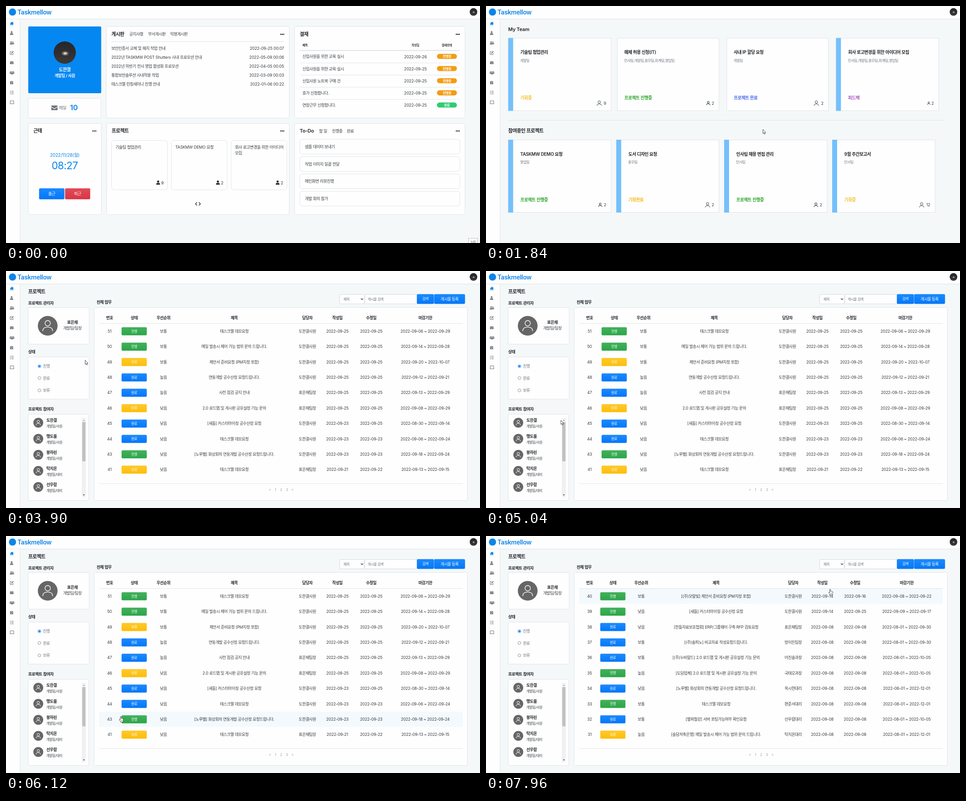
Recreate the animation shown at these times as an HTML page. Size 1057x530 px, loop 8 s.

```html
<!DOCTYPE html>
<html lang="ko">
<head>
<meta charset="utf-8">
<title>Groupware tour</title>
<style>
html, body { margin: 0; width: 100%; height: 100%; overflow: hidden; background: #f5f8f9; }
svg { display: block; width: 1057px; height: 530px; }
text { font-family: Inter, "Noto Sans CJK KR", "Noto Sans KR", sans-serif; letter-spacing: -.021em; white-space: pre; }
.k { letter-spacing: -.057em; }
.url { font-family: "Noto Sans", sans-serif; letter-spacing: 0; }
</style>
</head>
<body>
<svg id="stage" viewBox="0 0 1057 530" xmlns="http://www.w3.org/2000/svg"></svg>
<script>
const INK = '#363b40', GRAY = '#6c757d', BLUE = '#0d84e8', EDGE = '#dfe4e7';
const LOOP = 8000;

// drawing helpers
const text = (x, y, s, size = 9, fill = INK, weight = 400, anchor = 'start', extra = '') =>
  `<text x="${x}" y="${y}" font-size="${size}" fill="${fill}" font-weight="${weight}" text-anchor="${anchor}" ${extra}>` +
  String(s).replace(/&/g, '&amp;').replace(/</g, '&lt;').replace(/[가-힣]+/g, '<tspan class="k">$&</tspan>') + '</text>';
const mid = (x, y, s, size, fill, weight) => text(x, y, s, size, fill, weight, 'middle');
const bold = (x, y, s, size = 9, fill = '#212529') => text(x, y, s, size, fill, 600);
const rect = (x, y, x2, y2, fill, r = 0, extra = '') =>
  `<rect x="${x}" y="${y}" width="${x2 - x}" height="${y2 - y}" rx="${r}" fill="${fill}" ${extra}/>`;
const box = (x, y, x2, y2, r = 3, edge = EDGE) =>
  rect(x + .5, y + .5, x2 - .5, y2 - .5, '#fefefe', r, `stroke="${edge}"`);
const hline = (x, x2, y, c = EDGE, w = 1) => `<path d="M${x} ${y}H${x2}" stroke="${c}" stroke-width="${w}"/>`;
const disc = (x, y, r, fill, extra = '') => `<circle cx="${x}" cy="${y}" r="${r}" fill="${fill}" ${extra}/>`;
const path = (d, extra) => `<path d="${d}" ${extra}/>`;
const at = (x, y, s, body) => `<g transform="translate(${x} ${y}) scale(${s})">${body}</g>`;
const group = (id, body) => `<g id="${id}">${body}</g>`;
const dots = (x, y, id = '') =>
  `<g ${id && `id="${id}"`} fill="#212529">${[-3.2, 0, 3.2].map(d => `<circle cx="${x + d}" cy="${y}" r="1.35"/>`).join('')}</g>`;

const userSolid = (x, y, s = 1, c = GRAY) =>
  at(x, y, s, disc(0, -2, 2.1, c) + path('M-3.6 4V2.8Q-3.6 .6-1.4 .6H1.4Q3.6 .6 3.6 2.8V4Z', `fill="${c}"`));
const userLine = (x, y, s, c = INK, w = 1) =>
  at(x, y, s / 10, `<g fill="none" stroke="${c}" stroke-width="${w * 10 / s}">` +
    '<circle cy="-2.4" r="2.5"/><path d="M-4.5 5V4Q-4 1.2 0 1.2T4.5 4V5"/></g>');
const envelope = (x, y, s, c) => at(x, y, s,
  rect(-4, -3, 4, 3, c, .8) + path('M-4 -1.5L0 1.2L4 -1.5', 'fill="none" stroke="#fefefe" stroke-width=".7"'));
const photo = (x, y, r) => at(x, y, r / 25, '<g clip-path="url(#round)">' +
  disc(0, 0, 25, 'url(#sky)') + path('M-25 13Q-8 8 4 13T25 9V25H-25Z', 'fill="#3b3530"') +
  '<ellipse cx="1" cy="2" rx="10" ry="6.5" fill="url(#glow)"/></g>');

const SKIN = { blue: ['#1a8aff', '#0577f7'], red: ['#e04b59', '#d93545'], green: ['#43b05c', '#2ba648'], gold: ['#ffc92c', '#fdbe0a'] };
const gradient = ([id, [a, b]]) =>
  `<linearGradient id="${id}" x2="0" y2="1"><stop stop-color="${a}"/><stop offset="1" stop-color="${b}"/></linearGradient>`;
const button = (x, y, x2, y2, s, skin, size = 8, weight = 500) =>
  rect(x, y, x2, y2, `url(#${skin})`, 2, `stroke="${SKIN[skin][1]}" stroke-width=".5"`) +
  mid((x + x2) / 2, (y + y2) / 2 + size * .36, s, size, '#fff', weight);

const defs = `<defs>${Object.entries(SKIN).map(gradient).join('')}
  <linearGradient id="sky" x2="0" y2="1"><stop stop-color="#25262b"/><stop offset="1" stop-color="#38373a"/></linearGradient>
  <radialGradient id="glow"><stop stop-color="#fffbe8"/><stop offset=".22" stop-color="#d8d0bc"/><stop offset="1" stop-color="#555" stop-opacity="0"/></radialGradient>
  <clipPath id="round"><circle r="25"/></clipPath>
  <clipPath id="listClip"><rect x="51" y="328" width="118" height="178"/></clipPath></defs>`;

const sideIcons = () => {
  const line = `fill="none" stroke="${GRAY}" stroke-width="1"`;
  return path('M13 35.2L8.6 39.2H10V43H12.2V40.4H13.8V43H16V39.2H17.4L15.9 37.8V35.8H14.8V36.8Z', `fill="${BLUE}"`) +
    userSolid(12.5, 60.5) +
    userSolid(15.5, 82.5, .75) + userSolid(11.5, 82.5, .85) +
    path('M13.5 101.8H9.3V108.6H16V105.5', line) + path('M12 106.2L16.6 101.4', `stroke="${GRAY}" stroke-width="1.8"`) +
    envelope(12.8, 127, 1, GRAY) +
    userSolid(10, 148.6, .62) + userSolid(16.8, 148.6, .62) + userSolid(13.4, 149.5, .8) +
    rect(9, 168, 16, 175, GRAY, 1) + hline(9, 16, 169.8, '#fefefe', .6) + path('M10.8 172.4L12.2 173.6L14.4 171', 'fill="none" stroke="#fefefe"') +
    [190.5, 193.5, 196.5].map(y => hline(9, 10.4, y, GRAY, 1.3) + hline(11.6, 17, y, GRAY)).join('') +
    path('M9.6 218V212H17.2V218M8.4 218.7H18.4', line);
};

const frame = () =>
  rect(0, 0, 1057, 530, '#f5f8f9') + rect(0, 0, 31, 530, '#fefefe') + rect(31, 29, 32, 530, EDGE) +
  rect(0, 0, 1057, 29, '#fefefe') + rect(0, 28.5, 1057, 29.5, EDGE) +
  disc(14.5, 13.5, 8, BLUE) + text(25.5, 19, 'Taskmellow', 13.8, BLUE, 600) +
  photo(1042.5, 13.2, 8.6) + sideIcons();

function dashboard() {
  let s = rect(49.6, 45.7, 212.3, 195, '#0587f2', 2) + photo(131, 104, 25) +
    mid(131, 146, '도한결', 10, '#fff', 700) + mid(131, 159, '개발팀 / 사원', 8.8, '#fff', 700);
  s += box(49, 206, 212, 251) + envelope(108, 227.8, 1.75, GRAY) + text(118, 231, '메일', 9.6, GRAY, 500) +
    text(142.8, 233.4, '10', 16.4, BLUE, 600);

  s += box(49, 262, 213, 467) + bold(61, 283.2, '근태', 11) + dots(197, 279.5) +
    mid(131, 336.5, '2022/11/28(월)', 10, BLUE) + mid(131, 365, '08:27', 22.5, BLUE) +
    button(74, 408, 130, 432, '출근', 'blue', 9) + button(132, 408, 187.5, 432, '퇴근', 'red', 9);

  s += box(223, 45, 632, 251) + bold(235, 67, '게시판', 11) + text(275, 66.3, '공지사항') + text(317, 66.3, '부서게시판') +
    text(366, 66.3, '익명게시판') + dots(616, 63.3) + hline(235, 620, 79.5);
  ['보안인증서 교체 및 패치 작업 안내|09-25 00:07', '2022년 TASKMW POST Shutters 사내 프로모션 안내|05-09 00:06',
   '2022년 하반기 전사 영업 활성화 프로모션|04-05 00:05', '통합보안솔루션 사내적용 작업|03-09 00:03',
   '태스크멜 런칭세미나 진행 안내|01-06 00:22'].forEach((row, i) => {
    const [title, date] = row.split('|'), y = 98.2 + 20 * i;
    s += text(235, y, title) + text(620, y, '2022-' + date, 9, INK, 400, 'end');
  });

  s += box(643, 45, 1024, 251) + bold(655, 67, '결재', 11) + dots(1007.5, 63.3) + bold(661, 90, '제목', 6.6) +
    mid(913, 90, '작성일', 6.6, INK, 600) + mid(983, 90, '결재상태', 6.6, INK, 600) + hline(655, 1012, 99.5, '#d5dade', 1.3);
  ['신입사원을 위한 교육 실시', '신입사원을 위한 교육 실시', '신입사원 노트북 구매 건', '휴가 신청합니다.', '연장근무 신청합니다.'].forEach((title, i) => {
    const y = 113 + 27.2 * i, done = i == 4;
    s += text(661, y + 3.4, title) + mid(913, y + 3.6, `2022-09-${i ? 25 : 26}`, 9, INK, 400) +
      rect(961, y - 6, 1005.5, y + 5.3, done ? '#2ecc71' : '#f39c12', 5.6) + mid(983.2, y + 2.3, done ? '완료' : '진행중', 7.4, '#fff', 700);
    if (!done) s += hline(655, 1012, y + 14.2);
  });

  s += box(224, 262, 632, 467) + bold(235.5, 283.2, '프로젝트', 11) + dots(616, 279.5, 'more');
  [['기술팀 협업관리', '', 9], ['TASKMW DEMO 요청', '', 2], ['회사 로고변경을 위한 아이디어', '모집', 2]].forEach(([a, b, n], i) => {
    const x = 235 + 133.2 * i;
    s += box(x, 300, x + 125.5, 411.5, 6) + text(x + 9.3, 319, a) + text(x + 9.3, 332, b) +
      userSolid(x + 104.3, 395, 1.15, '#212529') + text(x + 111, 398.8, n, 9.4);
  });
  s += path('M426 439L422.5 442.5L426 446M430 439L433.5 442.5L430 446', 'fill="none" stroke="#212529" stroke-width="1.4"');

  s += box(643, 262, 1024, 467) + bold(655, 283.2, 'To-Do', 11) + text(698, 282.7, '할 일') + text(727, 282.7, '진행중') +
    text(760, 282.7, '완료') + dots(1007.5, 279.5);
  ['샘플 데이터 보내기', '작업 이미지 일괄 전달', '메인화면 리뷰진행', '개발 회의 참가'].forEach((title, i) => {
    const y = 297.5 + 38.8 * i;
    s += box(654.5, y, 1012.5, y + 34, 6) + text(666.5, y + 20.2, title);
  });
  return s;
}

function teams() {
  const ALL = '인사팀,개발팀,총무팀,회계팀,영업팀';
  const hue = { 기획중: '#f5c12e', '프로젝트 진행중': '#2ca52c', '프로젝트 완료': '#4d68ee', 피드백: '#a555c4', 기획완료: '#f6b81c' };
  const card = (x, x2, y, bar, title, sub, state, n, icon, size) => {
    const tx = x + (bar ? 27 : 16);
    return box(x, y, x2, y + 163, 0) + (bar ? rect(x, y, x + 11, y + 163, '#74c0fb') : '') +
      `<g ${title[0] == '기' ? 'id="pick"' : ''} fill="#212529">${bold(tx, y + 35.8, title, 9.8, 'inherit')}</g>` +
      text(tx - .5, y + 53, sub, 8, GRAY) + bold(tx, y + 137.8, state, 9.8, hue[state]) +
      userLine(icon, y + 146, size) + text(x2 - 11.5, y + 149, n, 9, INK, 400, 'end');
  };
  return bold(49.5, 55.8, 'My Team', 11) +
    card(49.5, 279.5, 71.5, 1, '기술팀 협업관리', '개발팀', '기획중', 9, 252.5, 11) +
    card(292.5, 520, 71.5, 0, '매체 허용 신청(IT)', ALL, '프로젝트 진행중', 2, 495.7, 8.5) +
    card(536.5, 764, 71.5, 0, '사내 IP 할당 요청', '개발팀', '프로젝트 완료', 2, 736.7, 11) +
    card(780.5, 1010, 71.5, 1, '회사 로고변경을 위한 아이디어 모집', ALL, '피드백', 2, 987.3, 6.8) +
    hline(49, 1023, 255.5) + bold(49.5, 283, '참여중인 프로젝트', 11) +
    card(49.5, 279.5, 299, 1, 'TASKMW DEMO 요청', '영업팀', '프로젝트 진행중', 2, 254.7, 8.5) +
    card(290.5, 520, 299, 1, '도서 디자인 요청', '총무팀', '기획완료', 2, 494, 11) +
    card(531, 761, 299, 1, '인사팀 채용 면접 관리', '인사팀', '프로젝트 진행중', 2, 735.7, 9.5) +
    card(772, 1002, 299, 1, '9월 주간보고서', '인사팀', '기획중', 12, 971.5, 11);
}

function project() {
  let s = bold(49.5, 49.6, '프로젝트', 11) + bold(49.5, 74.6, '프로젝트 관리자') + bold(202, 73.2, '전체 업무') +
    box(49, 81, 186, 164) + disc(93, 122.5, 22, '#666') + userLine(93, 122.5, 24, '#fff', 1.4) +
    mid(148, 118, '표은채', 9, '#212529', 600) + mid(148, 131.3, '개발팀/팀장', 8.8, INK, 400) +
    bold(49.5, 184.2, '상태') + box(49, 192, 186, 287) + bold(49.5, 311.5, '프로젝트 참여자') + box(49, 320, 185, 514);
  ['진행', '완료', '보류'].forEach((label, i) => {
    const y = [213, 239.3, 267][i];
    s += disc(74.5, y, 3.3, '#fff', `stroke="${i ? '#767676' : '#0b74f5'}" stroke-width=".8"`) +
      (i ? '' : disc(74.5, y, 2.1, '#0b74f5')) + text(82.5, y + 3.2, label, 8.8, GRAY);
  });
  const people = '도한결사원 맹도율사원 봉하린사원 탁지온대리 선우람대리 편준서대리 국태오과장 표은채팀장 옥시현대리'.split(' ');
  s += `<g clip-path="url(#listClip)">` + group('people', people.map((p, i) => {
    const y = 339.3 + 35.9 * i;
    return disc(72, y, 11, '#666') + userLine(72, y, 11, '#fff', 1) + bold(90, y - 2, p.slice(0, 3)) +
      text(90, y + 11, '개발팀/' + p.slice(3), 7.6);
  }).join('')) + '</g>';
  s += rect(169, 329, 178, 506, '#f1f1f1') + `<rect id="thumb" x="170" width="7.3" height="87.5" fill="#c1c1c1"/>` +
    '<path id="up" d="M171.4 335.3L173.6 332.8L175.8 335.3Z"/>' + path('M171.4 499.8L173.6 502.3L175.8 499.8Z', 'fill="#404040"');

  s += box(743.5, 52, 799.5, 74, 2, '#d3d9de') + text(752.5, 66, '제목', 7.7, GRAY) +
    path('M791.5 61.5L793.8 64L796.1 61.5', 'fill="none" stroke="#343a40" stroke-width="1.2"') +
    box(799.5, 52, 917.5, 74, 2, '#d3d9de') + text(806.5, 65.8, '게시물 검색', 7.7, GRAY) +
    button(916.5, 52, 954, 73.3, '검색', 'blue', 7.8) + button(955, 52, 1023.3, 73.3, '게시물 등록', 'blue', 8.8) +
    box(196, 81, 1029.5, 514) + '<rect id="rowHover" x="208" width="810" height="34" fill="#f3f9fd"/>' +
    hline(208, 1018, 117.5) + hline(208, 1018, 475.5) + '<rect id="pageHover" x="606" y="480.5" width="14.5" height="16.5" fill="#e6eaee"/>';
  [...'<123>'].forEach((c, i) => s += mid(588.5 + 12.6 * i, 491.7, c, 8, '#9aa1a8', 400));
  return s;
}

const ROW_TOP = 117.8, ROW_H = 34.38;
const LEVEL = { 진행: 'green', 보류: 'gold', 완료: 'blue' };
function table(cols, rows) {
  let s = '번호 상태 우선순위 제목 담당자 작성일 수정일 마감기한'.split(' ')
    .map((h, i) => mid(cols[i], 108, h, 8.9, '#212529', 600)).join('');
  rows.trim().split('\n').forEach((line, r) => {
    const [no, state, prio, title, who, made, edit, from, to] = line.trim().split('|');
    const y = 134.7 + ROW_H * r, day = d => '2022-' + d;
    s += button(cols[1] - 28, y - 8.6, cols[1] + 27.7, y + 8.9, state, LEVEL[state], 7.6);
    [no, , prio, title, who, day(made), day(edit), `${day(from)} ~ ${day(to)}`]
      .forEach((v, i) => s += mid(cols[i], y + 3.2, v, 8.9, INK, 400));
  });
  return s;
}
const pageOne = `51|진행|보통|태스크멜 데모요청|도한결사원|09-25|09-25|09-06|09-29
  50|진행|보통|메일 발송시 제어 가능 범위 문의 드립니다.|도한결사원|09-25|09-25|09-14|09-28
  49|보류|보통|제안서 준비요청 (PM지정 포함)|도한결사원|09-25|09-25|09-20|10-07
  48|완료|높음|연동개발 공수산정 요청드립니다.|도한결사원|09-25|09-25|09-12|09-21
  47|완료|높음|사전 점검 공지 안내|표은채팀장|09-25|09-25|09-13|09-29
  46|보류|낮음|2.0 로드맵 및 게시판 공유설정 기능 문의|표은채팀장|09-25|09-25|09-08|09-29
  45|완료|낮음|[새들] 커스터마이징 공수산정 요청|도한결사원|09-23|09-25|08-30|09-14
  44|완료|낮음|태스크멜 데모요청|도한결사원|09-23|09-23|09-06|09-24
  43|진행|낮음|[노루벨] 화상회의 연동개발 공수산정 요청드립니다.|도한결사원|09-23|09-23|09-18|09-24
  41|보류|낮음|태스크멜 데모요청|표은채팀장|09-21|09-22|09-13|09-15`;
const pageTwo = `40|진행|보통|[(주)모랄빛] 제안서 준비요청 (PM지정 포함)|도한결사원|09-14|09-16|09-08|09-22
  39|진행|낮음|[새들] 커스터마이징 공수산정 요청|도한결사원|09-14|09-25|09-09|09-17
  38|완료|낮음|[한들자료보호협회] ERP/그룹웨어 구축 RFP 검토요청|표은채팀장|09-08|09-08|08-01|09-30
  37|완료|보통|[(주)솔피노] 비교자료 작성요청드립니다.|방이든팀장|09-08|09-08|08-01|09-30
  36|완료|보통|[(주)누비랄드] 2.0 로드맵 및 게시판 공유설정 기능 문의|어진솔과장|09-08|09-08|08-01|10-05
  35|진행|높음|[도담업체] 2.0 로드맵 및 게시판 공유설정 기능 문의|국태오과장|09-08|09-08|08-01|10-05
  34|완료|낮음|[노루벨] 화상회의 연동개발 공수산정 요청드립니다.|옥시현대리|09-08|09-08|08-01|12-01
  33|진행|보통|태스크멜 데모요청|편준서대리|09-08|09-08|08-01|12-01
  32|완료|보통|[별뫼철강] 서버 포팅가능여부 확인요청|선우람대리|09-08|09-08|08-01|10-05
  31|보류|높음|[솔담저축은행] 메일 발송시 제어 가능 범위 문의 드립니다.|탁지온대리|09-08|09-08|08-01|12-01`;

const status = (id, w, s) => group(id, rect(-1, 523, w, 531, '#dee1e6', 1) + text(-2, 530.8, s, 6.4, '#50555b', 400, 'start', 'class="url"'));
const arrow = path('M0 0V9.2L2.1 7.3L3.5 10.6L5 10L3.6 6.8H6.4Z', 'fill="#fff" stroke="#222" stroke-width=".8" stroke-linejoin="round"');
const hand = path('M-1 7V.6Q-1 -.4 0 -.4T1 .6V4.2Q2 3.5 2.8 4.4Q3.8 3.8 4.4 4.8Q5.6 4.4 5.8 5.6V8.4Q5.6 10.4 4.6 11.2V12.6H-.2V11.4Q-1.8 9.4-3.2 7.2Q-3.2 5.6-1 7Z', 'fill="#fff" stroke="#222" stroke-width=".8" stroke-linejoin="round"') +
  path('M1.4 7.4V10M3 7.4V10', 'stroke="#222" stroke-width=".5"');

document.getElementById('stage').innerHTML = defs + frame() +
  group('dashboard', dashboard()) + group('teams', teams()) + group('project', project()) +
  group('tableOne', table([231, 286, 351, 509, 672, 739, 814.5, 935], pageOne)) +
  group('tableTwo', table([231, 283, 346, 513, 685, 750, 823, 938], pageTwo)) +
  group('tip', rect(1031.5, 519.5, 1051.5, 532, '#fefefe', 0, 'stroke="#b9bdc1"') + mid(1041.6, 530, '녹화', 7, '#777', 400)) +
  status('linkOne', 110.5, 'localhost:8888/taskmw/myProject.pr') +
  status('linkTwo', 152.5, 'localhost:8888/taskmw/projList.pr?no=4&cpage=2') +
  group('arrow', arrow) + group('hand', hand);

const el = id => document.getElementById(id);
const show = (id, on) => el(id).style.display = on ? '' : 'none';
const clamp = v => Math.max(0, Math.min(1, v));
const ease = (t, a, b) => { const u = clamp((t - a) / (b - a)); return u * u * (3 - 2 * u); };

// pointer way-points: time, x, y
const track = [
  [430, 766, 522], [800, 690, 392], [1090, 624, 288], [1230, 615, 275], [1300, 615, 275], [1430, 615, 271], [1570, 617.5, 276],
  [2510, 617.5, 276], [2700, 440, 292], [2900, 245, 272.5], [3060, 196, 232], [3230, 176.5, 199.5],
  [4690, 176.5, 199.5], [4850, 214, 212], [5000, 186, 310], [5130, 130, 366.5],
  [5850, 130, 366.5], [6060, 220, 396], [6260, 320, 415], [6330, 320, 415], [6700, 480, 452], [7080, 612.5, 485.5],
  [7420, 612.5, 485.5], [7690, 690, 300], [7960, 767.5, 119.5], [8000, 767.5, 119.5]];

const still = i => track[i][1] == track[i + 1][1] && track[i][2] == track[i + 1][2];
function slope(i, k) {
  if (i < 1 || i > track.length - 2 || still(i - 1) || still(i)) return 0;
  return (track[i + 1][k] - track[i - 1][k]) / (track[i + 1][0] - track[i - 1][0]);
}
function pointer(t) {
  let i = 0;
  while (i < track.length - 2 && t >= track[i + 1][0]) i++;
  const a = track[i], b = track[i + 1], d = b[0] - a[0], u = clamp((t - a[0]) / d), v = 1 - u;
  return [1, 2].map(k => v * v * (1 + 2 * u) * a[k] + u * u * (3 - 2 * u) * b[k] +
    d * u * v * (v * slope(i, k) - u * slope(i + 1, k)));
}

function render(t) {
  const page = t < 1770 ? 0 : t < 3630 ? 1 : t < 7140 ? 2 : 3;
  const [x, y] = pointer(t);
  const seen = t >= 430;
  show('dashboard', page == 0);
  show('teams', page == 1);
  show('project', page > 1);
  show('tableOne', page == 2);
  show('tableTwo', page == 3);
  show('tip', t < 70);

  const onMore = page == 0 && seen && x < 621 && y < 285;
  const onCard = page == 1 && x < 279 && y < 234;
  const row = Math.floor((y - ROW_TOP) / ROW_H);
  const onRow = page > 1 && x > 208 && row >= 0 && row < 10;
  const onPage = page > 1 && x > 606 && x < 620 && y > 480;
  el('more').setAttribute('fill', onMore ? BLUE : '#212529');
  el('pick').setAttribute('fill', onCard ? BLUE : '#212529');
  show('linkOne', onMore);
  show('linkTwo', onPage);
  show('pageHover', onPage);
  show('rowHover', onRow);
  el('rowHover').setAttribute('y', ROW_TOP + ROW_H * row);

  const scroll = ease(t, 5130, 5450) - ease(t, 5520, 5850);
  el('people').setAttribute('transform', `translate(0 ${-143 * scroll})`);
  el('thumb').setAttribute('y', 338 + 70 * scroll);
  el('up').setAttribute('fill', scroll > 0 ? '#404040' : '#a3a3a3');

  const link = onMore && t < 1500 || onCard && t < 3360 || onRow || onPage;
  show('arrow', seen && !link);
  show('hand', seen && link);
  for (const id of ['arrow', 'hand']) el(id).setAttribute('transform', `translate(${x} ${y})`);
}

const start = performance.now();
function tick() {
  render((performance.now() - start) % LOOP);
  requestAnimationFrame(tick);
}
tick();
</script>
</body>
</html>
```
